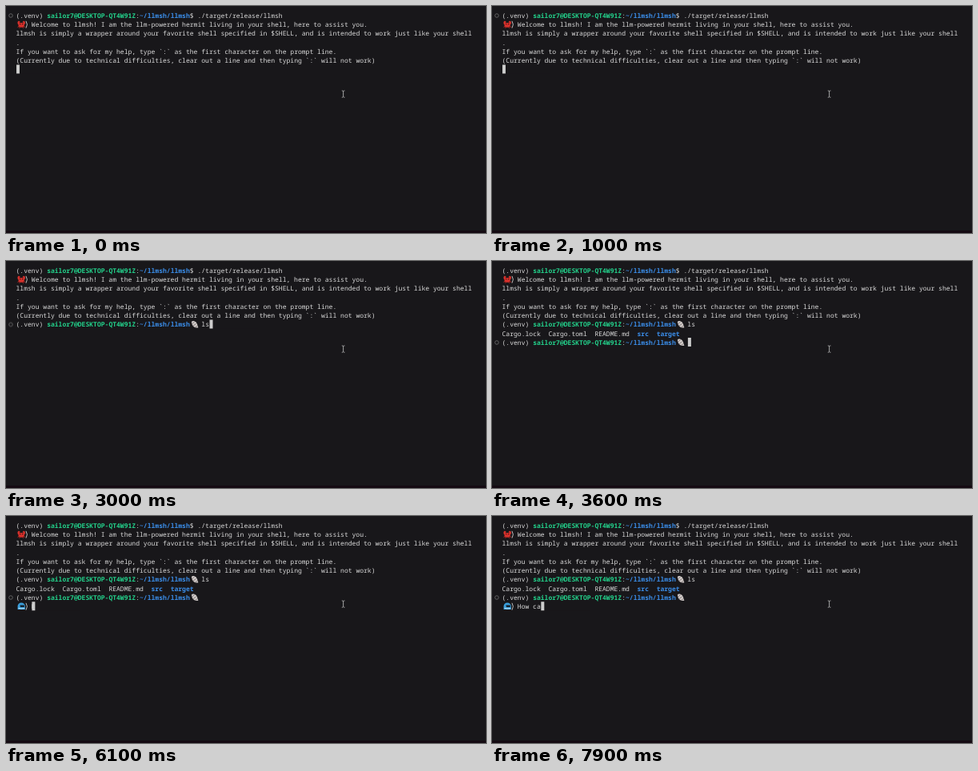
Recreate the animation shown at these times as an HTML page. Size 600x284 px, loop 8000 ms.

```html
<!DOCTYPE html>
<html lang="en">
<head>
<meta charset="utf-8">
<title>llmsh session</title>
<style>
  html, body { margin: 0; height: 100%; overflow: hidden; background: #18171a; }
  svg { display: block; width: 100vw; height: 100vh; --cw: 4.83px; --lh: 11.25px; }
  text {
    font: 8.05px "Noto Sans Mono", "DejaVu Sans Mono", monospace;
    fill: #dadada; white-space: pre; text-rendering: geometricPrecision;
  }
  .user { fill: #23d18b; font-weight: 700; }
  .path { fill: #3b8eea; font-weight: 700; }
  .arc { fill: none; stroke: #cfcfcf; stroke-width: .9; }

  .prompt, .listing, .chat, .marker, .cursor { animation: 8s step-end infinite; }
  .prompt { animation-name: prompt; }
  .listing { animation-name: listing; }
  .chat { animation-name: chat; }
  .marker { animation-name: marker; }
  .cursor { animation-name: cursor; shape-rendering: crispEdges; }

  @keyframes prompt { 0% { opacity: 0 } 13.75%, 100% { opacity: 1 } }
  @keyframes listing { 0% { opacity: 0 } 45%, 100% { opacity: 1 } }
  @keyframes chat { 0% { opacity: 0 } 75%, 100% { opacity: 1 } }
  @keyframes marker {
    0% { transform: none }
    13.75% { transform: translateY(calc(6 * var(--lh))) }
    45%, 100% { transform: translateY(calc(8 * var(--lh))) }
  }
  @keyframes cursor {
    0% { transform: translate(0, calc(6 * var(--lh))) }
    13.75% { transform: translate(calc(48 * var(--cw)), calc(6 * var(--lh))) }
    31.25% { transform: translate(calc(49 * var(--cw)), calc(6 * var(--lh))) }
    33.75% { transform: translate(calc(50 * var(--cw)), calc(6 * var(--lh))) }
    45% { transform: translate(calc(48 * var(--cw)), calc(8 * var(--lh))) }
    75% { transform: translate(calc(4 * var(--cw)), calc(9 * var(--lh))) }
    90% { transform: translate(calc(5 * var(--cw)), calc(9 * var(--lh))) }
    92.5% { transform: translate(calc(6 * var(--cw)), calc(9 * var(--lh))) }
    93.75% { transform: translate(calc(7 * var(--cw)), calc(9 * var(--lh))) }
    96.25% { transform: translate(calc(8 * var(--cw)), calc(9 * var(--lh))) }
    97.5% { transform: translate(calc(9 * var(--cw)), calc(9 * var(--lh))) }
    98.75%, 100% { transform: translate(calc(10 * var(--cw)), calc(9 * var(--lh))) }
  }
</style>
</head>
<body>
<svg viewBox="0 0 600 284">
  <defs>
    <text id="ps1" x="12.5" y="14.8">(.venv) <tspan class="user">sailor7@DESKTOP-QT4W91Z</tspan>:<tspan class="path">~/llmsh/llmsh</tspan></text>
    <g id="shell">
      <path d="M231.800 8.800q1-1.800 3.200-1.200 3.200.8 4 4 .6 2.600 1.400 4.200-3.200.6-5.400-.8-2.600-1.800-3.200-6.200z" fill="#d0cac8"/>
      <path d="M232.400 11.200l3.200-2.600M233.600 13.800l4-2.800M236.400 15.400l3-1.800" stroke="#706868" stroke-width=".8"/>
    </g>
  </defs>

  <rect width="600" height="284" fill="#18171a"/>
  <rect y="281" width="600" height="3" fill="#140a12"/>

  <use href="#ps1"/>
  <text x="229.8" y="14.8">$ ./target/release/llmsh</text>

  <g fill="#d4302b">
    <rect x="15.600" y="21" width="7.200" height="5.800" rx="2"/>
    <path d="M15.400 23.400q-2-2.400 0-4.600l2.400.2-1 1.600 1.200 1zM23 23.400q2-2.400 0-4.600l-2.400.2 1 1.600-1.200 1z"/>
    <path d="M15.800 25l-1.200 2M17.400 26.400l-.8 1.600M21 26.400l.8 1.600M22.600 25l1.200 2" stroke="#a82420" stroke-width=".9"/>
    <path d="M17.200 22.600h1.200M20 22.600h1.200" stroke="#2a1010"/>
  </g>
  <path class="arc" d="M25 18.800q2.800 4.400 0 8.800"/>
  <text x="31.8" y="26.05">Welcome to llmsh! I am the llm-powered hermit living in your shell, here to assist you.</text>
  <text x="12.5" y="37.3">llmsh is simply a wrapper around your favorite shell specified in $SHELL, and is intended to work just like your shell</text>
  <text x="12.5" y="48.55">.</text>
  <text x="12.5" y="59.8">If you want to ask for my help, type `:` as the first character on the prompt line.</text>
  <text x="12.5" y="71.05">(Currently due to technical difficulties, clear out a line and then typing `:` will not work)</text>

  <g class="prompt">
    <use href="#ps1" y="67.5"/>
    <use href="#shell" y="67.5"/>
    <text x="244.3" y="82.3">ls</text>
  </g>

  <g class="listing">
    <text x="12.5" y="93.55">Cargo.lock  Cargo.toml  README.md  <tspan class="path">src</tspan>  <tspan class="path">target</tspan></text>
    <use href="#ps1" y="90"/>
    <use href="#shell" y="90"/>
  </g>

  <g class="chat">
    <path d="M14.600 117v-4.400q.4-4 4.600-4.200 4.200.2 4.600 4.200v4.400z" fill="#3a9fdc"/>
    <path d="M17.400 111.400h5.400v2.600h-4.800z" fill="#16222c"/>
    <path d="M15.400 115.200q3 1.400 7.800.4" fill="none" stroke="#d4e8f2" stroke-width=".9"/>
    <path class="arc" d="M25 108.800q2.800 4.400 0 8.800"/>
    <text x="31.8" y="116.05">How ca</text>
  </g>

  <!-- The backdrop hides text that has not been typed yet. -->
  <g class="cursor">
    <rect x="12.5" y="6.2" width="60" height="11" fill="#18171a"/>
    <rect x="12.5" y="6.2" width="4.8" height="11" fill="#cccccc"/>
  </g>

  <circle class="marker" cx="6" cy="12" r="2.3" fill="none" stroke="#707070" stroke-width=".8"/>
  <path d="M419.800 106h1.200l.6.6.6-.6h1.200M421.600 106.600v7M419.800 114.200h1.200l.6-.6.6.6h1.200" fill="none" stroke="#c8c8c8" stroke-width=".8"/>
</svg>
</body>
</html>
```
